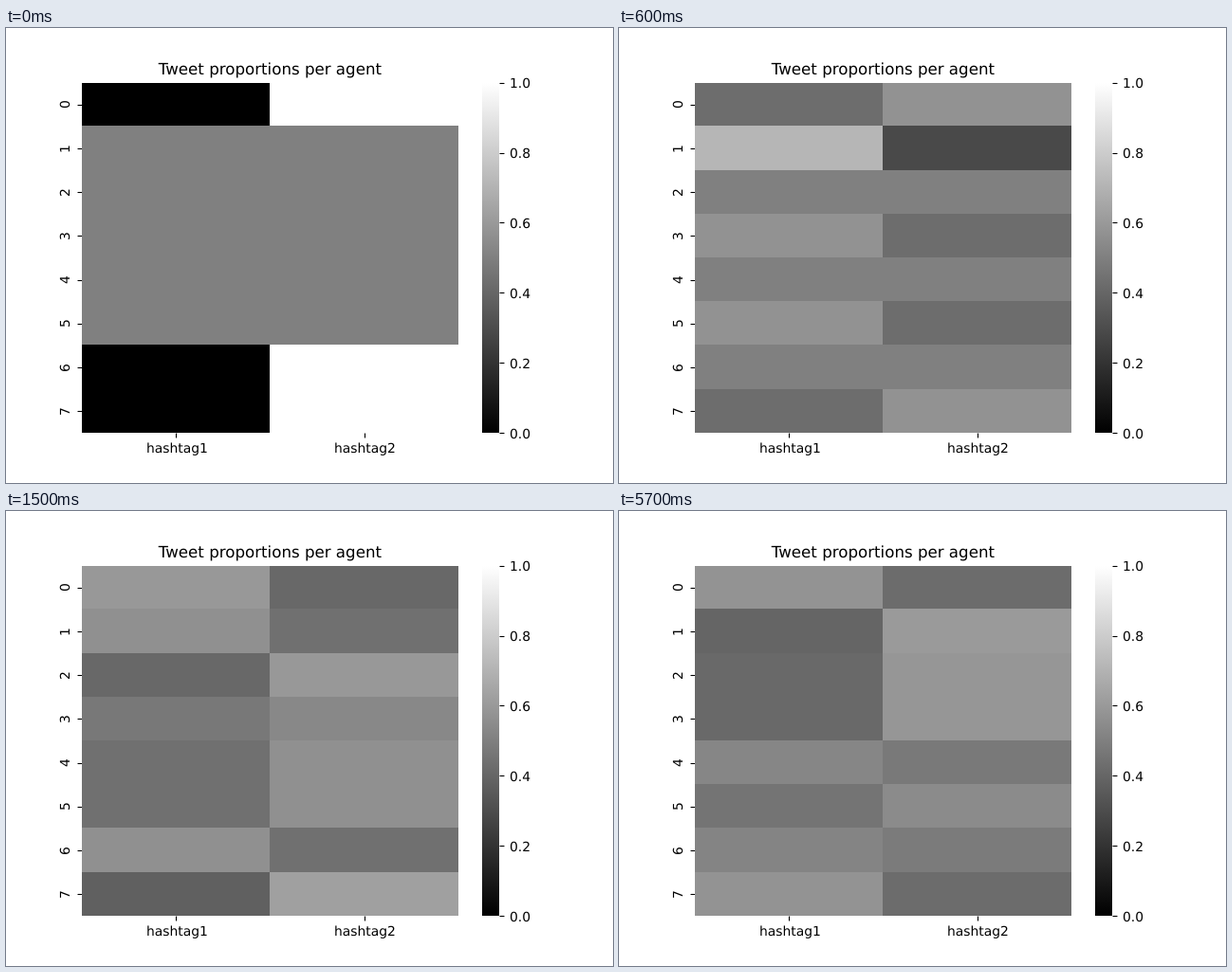
Write an HTML page that moves like this. It is 640 px wide and 480 px high and loops after 7300 ms.

```html
<!DOCTYPE html>
<html lang="en">
<head>
<meta charset="utf-8">
<title>Tweet proportions per agent</title>
<style>
  html, body { margin: 0; width: 100%; height: 100%; overflow: hidden; background: #fff; }
  svg { display: block; width: 640px; height: 480px; }
  text { font: 13.89px "DejaVu Sans", sans-serif; fill: #000; text-rendering: geometricPrecision; }
  .title { font-size: 16.67px; text-anchor: middle; }
  .cell { shape-rendering: crispEdges; }
  .tick { stroke: #000; stroke-width: 1.11; }
</style>
</head>
<body>
<svg id="chart" viewBox="0 0 640 480">
  <defs>
    <linearGradient id="scale" x1="0" y1="0" x2="0" y2="1">
      <stop offset="0" stop-color="#fff"/>
      <stop offset="1" stop-color="#000"/>
    </linearGradient>
  </defs>
  <text class="title" x="278.4" y="49">Tweet proportions per agent</text>
  <rect class="cell" x="502" y="58" width="18" height="369" fill="url(#scale)"/>
</svg>
<script>
const STEP = 100, STEPS = 73, AGENTS = 8;
const LEFT = 80, TOP = 57.6, WIDTH = 396.8, HEIGHT = 369.6;
const ROW = HEIGHT / AGENTS, COL = WIDTH / 2;

// Key points: hashtag1 tweets per agent. Every step adds two tweets to each agent.
const KEYS = [
  { step: 0, counts: [0, 1, 1, 1, 1, 1, 0, 0] },
  { step: 2, counts: [3, 4, 3, 4, 4, 4, 1, 1] },
  { step: 4, counts: [4, 7, 5, 6, 5, 6, 4, 4] },
  { step: 8, counts: [9, 12, 8, 11, 8, 9, 10, 8] },
  { step: 15, counts: [19, 18, 13, 15, 14, 14, 18, 12] },
  { step: 35, counts: [44, 30, 27, 25, 34, 32, 41, 42] },
  { step: 57, counts: [67, 46, 48, 48, 61, 53, 60, 67] }
];

const chart = document.getElementById("chart");
const total = step => 2 * (step + 1);
const rowEdge = r => Math.max(Math.round(TOP), Math.floor(TOP + r * ROW));
const colEdge = c => Math.round(LEFT + c * COL);

function add(tag, attrs, text = "") {
  const el = document.createElementNS("http://www.w3.org/2000/svg", tag);
  for (const name in attrs) el.setAttribute(name, attrs[name]);
  el.textContent = text;
  return chart.appendChild(el);
}

function tick(x, y, dx, dy) {
  add("line", { class: "tick", x1: x, y1: y, x2: x + dx, y2: y + dy });
}

function addCell(r, c) {
  const x = colEdge(c), y = rowEdge(r);
  return add("rect", { class: "cell", x, y, width: colEdge(c + 1) - x, height: rowEdge(r + 1) - y });
}

for (let c = 0; c < 2; c++) {
  const x = LEFT + (c + 0.5) * COL;
  tick(Math.round(x) + 0.5, 427.5, 0, 5);
  add("text", { x: Math.round(x - 31.5), y: 448 }, "hashtag" + (c + 1));
}

for (let i = 0; i <= 5; i++) {
  const y = TOP + HEIGHT * (1 - i / 5);
  tick(520.5, Math.round(y) + 0.5, 5, 0);
  add("text", { x: 531, y: Math.ceil(y + 5) }, (i / 5).toFixed(1));
}

const rows = [];
for (let r = 0; r < AGENTS; r++) {
  const y = TOP + (r + 0.5) * ROW;
  tick(80.5, Math.round(y) + 0.5, -5, 0);
  add("text", { transform: `translate(67 ${Math.round(y + 4.7)}) rotate(-90)` }, r);
  rows.push([addCell(r, 0), addCell(r, 1)]);
}

// Shares drift evenly between key points, rounded to whole tweets.
function share(agent, step) {
  const k = Math.min(step, KEYS[KEYS.length - 1].step);
  const i = Math.max(1, KEYS.findIndex(key => key.step >= k));
  const [a, b] = [KEYS[i - 1], KEYS[i]];
  const p = a.counts[agent] / total(a.step);
  const q = b.counts[agent] / total(b.step);
  const f = (k - a.step) / (b.step - a.step);
  return Math.round((p + (q - p) * f) * total(k)) / total(k);
}

function gray(p) {
  const v = Math.min(255, Math.floor(p * 256));
  return `rgb(${v},${v},${v})`;
}

function draw(step) {
  rows.forEach(([left, right], agent) => {
    const p = share(agent, step);
    left.setAttribute("fill", gray(p));
    right.setAttribute("fill", gray(1 - p));
  });
}

const start = performance.now();
function loop() {
  draw(Math.floor((performance.now() - start) / STEP) % STEPS);
  requestAnimationFrame(loop);
}
loop();
</script>
</body>
</html>
```
